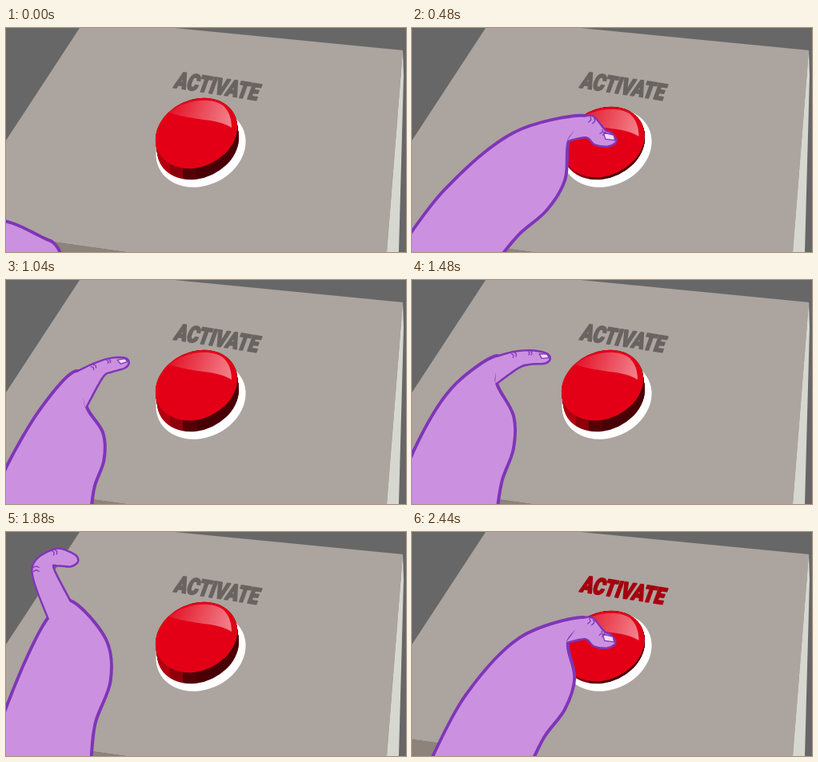
An HTML page with a canvas that plays this animation: 500x281 px, repeating every 2480 ms.

```html
<!DOCTYPE html>
<html lang="en">
<head>
<meta charset="utf-8">
<title>Activate button</title>
<style>
html, body { margin: 0; width: 100%; height: 100%; overflow: hidden; background: #676767; }
canvas { display: block; width: 100vw; height: 100vh; }
</style>
</head>
<body>
<canvas id="stage" width="500" height="281"></canvas>
<script>
const ctx = document.getElementById('stage').getContext('2d');
const LOOP = 2480, STEP = 40;
const SKIN = '#cb91e0', LINE = '#8035b8', TILT = -0.45, FLOOR = 292;

const clamp = v => Math.max(0, Math.min(1, v));
const smooth = k => k * k * (3 - 2 * k);
// Blends numbers, or lists of numbers of any depth.
const mix = (a, b, k) =>
  Array.isArray(a) ? a.map((v, i) => mix(v, b[i], k)) : a + (b - a) * k;

// A pose: ends of the wrist (top, pit), three finger joints, swell of the
// two arm edges (bow, side), finger thickness, and where the arm leaves the stage.
const pose = (top, pit, joints, bow, side, thick, left = -23, right = 104) =>
  [top, pit, joints, bow, side, thick, left, right];

const low = pose([5, 246], [48, 266], [[14, 262], [18, 263], [22, 264]], 18, 4, 0.3, -110, 72);
const blob = pose([67, 152], [98, 165], [[76, 160], [80, 161], [84, 162]], 16, 19, 0.3);
const fist = pose([66, 150], [99, 165], [[79, 155], [84, 155], [90, 157]], 16, 20, 0.8);
const reach = pose([89, 116], [99, 160], [[114, 114], [130, 107], [147, 104]], 12, 20, 1);
const point = pose([106, 97], [104, 130], [[130, 100], [148, 97], [166, 98]], 24, 22, 1);
const raise = pose([54, 109], [80, 88], [[46, 46], [63, 32], [82, 35]], 5, 39, 1.3);
const press = pose([214, 109], [193, 138], [[221, 121], [234, 134], [246, 137]], 36, 22, 1.35, 23, 146);

const shift = (p, dx, dy) => {
  const move = ([x, y]) => [x + dx, y + dy];
  return [move(p[0]), move(p[1]), p[2].map(move), ...p.slice(3)];
};
// The pressing finger on an arm that has not moved at its base.
const lean = (dx, dy) => shift([...press.slice(0, 6), ...point.slice(6)], dx, dy);

// time, pose, button depth, finger detail
const keys = [
  [0, low, 0, 0],
  [160, blob, 0, 0],
  [240, lean(4, -2), 0, 1],
  [400, lean(4, -2), 0, 1],
  [480, lean(1, 3), 1, 1],
  [560, lean(3, -2), 0, 1],
  [760, fist, 0, 0],
  [1040, reach, 0, 1],
  [1240, lean(16, -8), 0, 1],
  [1480, point, 0, 1],
  [1880, raise, 0, 1],
  [2040, shift(press, 2, -4), 1, 1],
  [2120, shift(press, 0, 2), 1, 1],
  [2440, press, 1, 1]
];

function stateAt(t) {
  let i = keys.length - 2;
  while (i > 0 && keys[i][0] > t) i--;
  const [from, ...a] = keys[i], [to, ...b] = keys[i + 1];
  return mix(a, b, smooth(clamp((t - from) / (to - from))));
}

function poly(pts, fill) {
  ctx.beginPath();
  pts.forEach(p => ctx.lineTo(...p));
  ctx.closePath();
  ctx.fillStyle = fill;
  ctx.fill();
}

function disc(x, y, rx, ry, fill) {
  ctx.beginPath();
  ctx.ellipse(x, y, rx, ry, TILT, 0, Math.PI * 2);
  ctx.fillStyle = fill;
  ctx.fill();
}

function spline(pts) {
  const path = new Path2D();
  path.moveTo(...pts[0]);
  for (let i = 0; i < pts.length - 1; i++) {
    const p = pts[i], q = pts[i + 1], o = pts[i - 1] || p, r = pts[i + 2] || q;
    path.bezierCurveTo(p[0] + (q[0] - o[0]) / 6, p[1] + (q[1] - o[1]) / 6,
      q[0] - (r[0] - p[0]) / 6, q[1] - (r[1] - p[1]) / 6, q[0], q[1]);
  }
  return path;
}

// Point at k along a-b, pushed out to the left of travel.
function bulge(a, b, k, push) {
  const dx = b[0] - a[0], dy = b[1] - a[1], len = Math.hypot(dx, dy) || 1;
  return [a[0] + dx * k + dy / len * push, a[1] + dy * k - dx / len * push];
}

function drawBox() {
  ctx.fillStyle = '#676767';
  ctx.fillRect(0, 0, 500, 281);
  poly([[92, 0], [211, 0], [496, 28], [476, 281], [150, 281], [0, 260], [0, 141]], '#aca49f');
  poly([[0, 260], [150, 281], [0, 281]], '#8d837a');
  poly([[496, 28], [497, 60], [491, 281], [476, 281]], '#d7d7d1');
}

function drawLabel(glow) {
  ctx.save();
  ctx.transform(0.81, 0.125, -0.36, 1, 209, 74.5);
  ctx.font = '900 27.5px Roboto, Inter, sans-serif';
  ctx.fillStyle = ctx.strokeStyle = `rgb(${mix([105, 100, 97], [165, 0, 15], glow).map(Math.round)})`;
  ctx.lineWidth = 1.8;
  ctx.fillText('ACTIVATE', 0, 0);
  ctx.strokeText('ACTIVATE', 0, 0);
  ctx.restore();
}

function drawButton(depth) {
  disc(243.5, 150.5, 58, 47, '#fff');
  const base = [240, 146], top = mix([238, 132], [239.5, 143], depth);
  const side = ctx.createLinearGradient(188, 0, 292, 0);
  const bands = ['#b0000f', '#8c000c', '#540007', '#480006'];
  bands.forEach((color, i) => {
    side.addColorStop(i * 0.16, color);
    side.addColorStop(i < 3 ? (i + 1) * 0.16 : 1, color);
  });
  for (let i = 0; i <= 14; i++) disc(...mix(base, top, i / 14), 53, 42, side);
  disc(...top, 53, 42, '#e30016');

  ctx.save();
  ctx.translate(top[0] - 238, top[1] - 132);
  const shine = ctx.createLinearGradient(210, 95, 280, 120);
  shine.addColorStop(0, '#e4162a');
  shine.addColorStop(1, '#f2808a');
  ctx.beginPath();
  ctx.moveTo(204, 106);
  ctx.bezierCurveTo(222, 90, 256, 86, 271, 97);
  ctx.bezierCurveTo(279, 104, 282, 114, 282, 125);
  ctx.bezierCurveTo(264, 113, 236, 117, 204, 106);
  ctx.fillStyle = shine;
  ctx.fill();
  ctx.restore();
}

function drawHand([top, pit, joints, bow, side, thick, left, right], detail) {
  const start = [left, FLOOR], end = [right, FLOOR];
  const arm = spline([
    start, bulge(start, top, 0.35, bow * 0.85), bulge(start, top, 0.72, bow), top, pit,
    ...[0.25, 0.5, 0.75].map((k, i) => bulge(pit, end, k, side * [0.95, 0.95, 0.3][i])), end
  ]);

  // Each joint gets a local frame: along the finger, and out of its back.
  const chain = [mix(top, pit, 0.5), ...joints];
  const frames = joints.map(([x, y], i) => {
    const a = chain[i], b = chain[i + 2] || chain[i + 1];
    const angle = Math.atan2(b[1] - a[1], b[0] - a[0]);
    const r = (9.5 - 2 * i) * thick, c = Math.cos(angle) * r, s = Math.sin(angle) * r;
    return (u, v) => [x + c * u + s * v, y + s * u - c * v];
  });
  const tip = frames[2];
  const finger = spline([
    top, ...frames.map(f => f(0, 1)), tip(1, 0),
    ...frames.map(f => f(0, -1)).reverse(), pit
  ]);

  ctx.lineJoin = ctx.lineCap = 'round';
  ctx.strokeStyle = LINE;
  ctx.fillStyle = SKIN;
  ctx.lineWidth = 8;
  ctx.stroke(arm);
  ctx.lineWidth = 5;
  ctx.stroke(finger);
  ctx.fill(arm);
  ctx.fill(finger);

  if (thick > 0.6) {
    ctx.lineWidth = 1.3;
    for (const f of frames.slice(0, 2)) {
      for (const u of [-0.25, 0.15]) ctx.stroke(spline([f(u, 0.95), f(u + 0.15, 0.7), f(u, 0.4)]));
    }
  }
  if (detail > 0.5 && joints[2][1] > 60) {
    poly([tip(-1.3, 0.9), tip(0.5, 0.9), tip(0.9, 0.1), tip(-0.7, -0.1)], '#f0dcf8');
    ctx.stroke();
  }
}

function draw(now) {
  const t = Math.floor((now % LOOP) / STEP) * STEP;
  const [hand, depth, detail] = stateAt(t);
  drawBox();
  drawLabel(clamp((t - 2040) / 320));
  drawButton(depth);
  drawHand(hand, detail);
}

let start;
function tick(now) {
  if (start === undefined) start = now;
  draw(now - start);
  requestAnimationFrame(tick);
}
draw(0);
requestAnimationFrame(tick);
</script>
</body>
</html>
```
